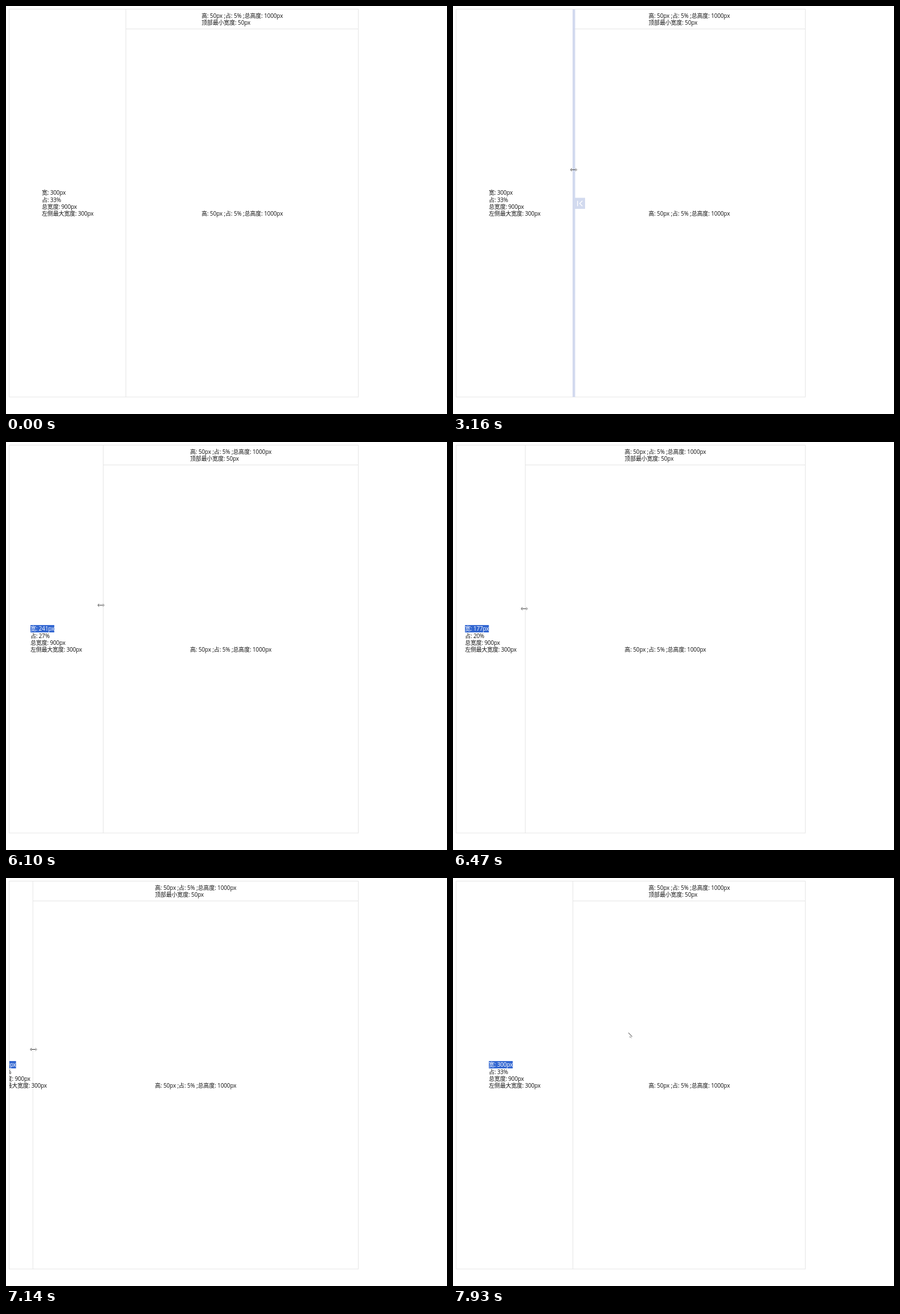
Write an HTML page that moves like this. It is 778x720 px and loops after 8000 ms.

```html
<!DOCTYPE html>
<html lang="zh-CN">
<head>
<meta charset="utf-8">
<title>Resizable panels</title>
<style>
html, body { margin: 0; width: 100%; height: 100%; overflow: hidden; background: #fff; }
svg { display: block; width: 778px; height: 720px; }
text {
  font: 9.94px "Open Sans", "Noto Sans CJK SC", "Noto Sans CJK", sans-serif;
  letter-spacing: -.15px; fill: #111; white-space: pre;
}
#right text { letter-spacing: -.08px; }
.line { fill: none; stroke: #e5e5e5; }
.ink { fill: none; stroke: #333; }
.soft { fill: none; stroke: #888; }
</style>
</head>
<body>
<svg width="778" height="720">
  <clipPath id="inside"><rect x="6" y="6" width="616" height="684"/></clipPath>
  <rect class="line" x="5.5" y="5.5" width="616" height="684.5"/>
  <path class="line" id="split"/>
  <g id="handle" fill="#ced6ee">
    <rect y="6" width="4.5" height="684"/>
    <rect x="4" y="338.5" width="18" height="19.5"/>
    <path d="M8.7 343.7v9.6M17.3 343.7l-4.8 4.8 4.8 4.8" fill="none" stroke="#fff" stroke-width="1.4"/>
  </g>
  <g clip-path="url(#inside)">
    <g id="left">
      <rect id="mark" y="323" height="13" fill="#3367d1"/>
      <text id="width" y="333.2"></text>
      <text id="share" y="345.6"></text>
      <text y="357.9">总宽度: 900px</text>
      <text y="370.3">左侧最大宽度: 300px</text>
    </g>
  </g>
  <g id="right">
    <text y="20.7">高: 50px ;占: 5% ;总高度: 1000px</text>
    <text y="33">顶部最小宽度: 50px</text>
    <text y="369.5">高: 50px ;占: 5% ;总高度: 1000px</text>
  </g>
  <g id="resize">
    <path class="ink" d="M-4 0H4M-3.5-2.5L-5.5 0l2 2.5"/>
    <path class="soft" d="M3-2.5L6 0 3 2.5"/>
  </g>
  <g id="arrow">
    <path class="ink" d="M0 0l6.5 7"/>
    <path class="soft" d="M1.5 8l2-1.2 1.5 2.7"/>
  </g>
</svg>
<script>
const LOOP = 8000, SCALE = .685;
const $ = id => document.getElementById(id);
const move = (id, x, y = 0) => $(id).setAttribute("transform", `translate(${x} ${y})`);
const show = (id, on) => $(id).style.display = on ? "" : "none";

function draw(t) {
  // progress from 0 to 1 between two times
  const ramp = (from, to) => Math.min(1, Math.max(0, (t - from) / (to - from)));
  const enter = ramp(330, 570), approach = ramp(810, 960), hover = ramp(2020, 4390);
  const pull = ramp(5380, 6100), squeeze = ramp(6190, 6850), settle = ramp(6900, 7140);
  const back = ramp(7230, 7930), leave = ramp(7780, 7930);

  const w = Math.round(300 - 59 * pull - 150 * squeeze - 31 * settle + 240 * back);
  const x = 6 + w * SCALE, edge = Math.floor(x) + .5;
  $("split").setAttribute("d", `M${edge} 6V690M${edge} 40.5H621.5`);

  $("width").textContent = `宽: ${w}px`;
  $("share").textContent = `占: ${Math.round(w / 9)}%`;
  move("left", (6 + x) / 2 - 45.4);
  move("right", (x + 622) / 2 - 71.8);

  const selected = t >= 5380;
  show("mark", selected);
  $("mark").setAttribute("width", $("width").getComputedTextLength());
  $("width").style.fill = selected ? "#fff" : "";

  // the handle trails the edge and shows again briefly while squeezing
  move("handle", edge - .5 + 4 * squeeze);
  $("handle").style.opacity = .8 * ramp(900, 1130) + .2 * hover - ramp(5380, 5560)
    + .25 * (ramp(6720, 6790) - ramp(6790, 6930));

  const px = x + 236.5 - 293 * enter + 56 * approach + 4 * hover - 7 * pull + 5 * squeeze + 96.5 * leave;
  const py = 626 - 397 * enter + 59 * approach + 2 * hover - 2 * pull + 14.5 * squeeze - 29.5 * back;
  const resizing = t >= 940 && t < 7860;
  move("resize", px, py);
  move("arrow", px, py);
  show("resize", resizing);
  show("arrow", !resizing && t >= 330);
}

const start = performance.now();
function tick() {
  draw((performance.now() - start) % LOOP);
  requestAnimationFrame(tick);
}
tick();
</script>
</body>
</html>
```
